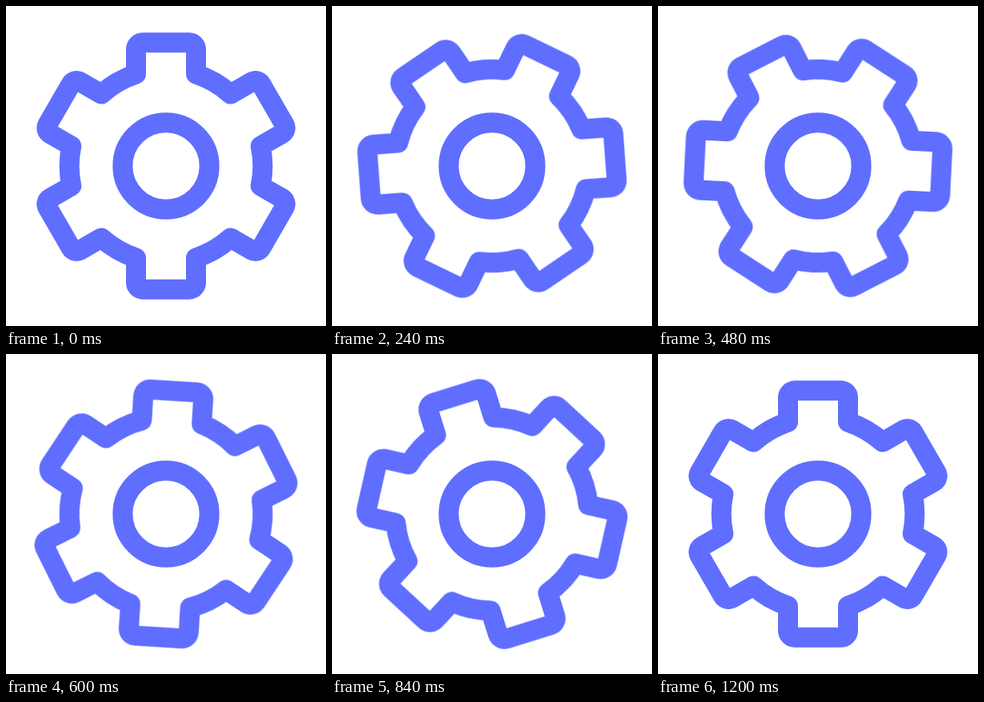
Write an HTML page that moves like this. It is 400x400 px and loops after 1230 ms.

```html
<!DOCTYPE html>
<html lang="en">
<head>
<meta charset="utf-8">
<title>Spinning gear</title>
<style>
  html, body { margin: 0; width: 100%; height: 100%; overflow: hidden; background: #fff; }
  svg { display: block; width: 100vw; height: 100vh; }
  svg * { fill: none; stroke: #5f6eff; stroke-width: 25; stroke-linejoin: round; }
  #gear { transform-origin: 0 0; }
</style>
</head>
<body>
<svg viewBox="-200 -200 400 400">
  <path id="gear"/>
  <circle r="54.17"/>
</svg>
<script>
  const TEETH = 6, RING = 120.83, TIP = 154.17, HALF = 37.5, CORNER = 8.33;
  const LOOP = 1230, SPIN = 1200;

  const base = Math.sqrt(RING * RING - HALF * HALF);
  const shoulder = TIP - CORNER, flat = HALF - CORNER;

  // One tooth pointing up: [command, x, y]
  const corner = `A${CORNER} ${CORNER} 0 0 1 `;
  const tooth = [
    [`A${RING} ${RING} 0 0 1 `, -HALF, -base],
    ['L', -HALF, -shoulder],
    [corner, -flat, -TIP],
    ['L', flat, -TIP],
    [corner, HALF, -shoulder],
    ['L', HALF, -base]
  ];

  function gearPath() {
    let d = '';
    for (let i = 0; i <= TEETH; i++) {
      const a = i * 2 * Math.PI / TEETH, c = Math.cos(a), s = Math.sin(a);
      const steps = i < TEETH ? tooth : tooth.slice(0, 1);
      for (const [cmd, x, y] of steps) {
        const px = (x * c - y * s).toFixed(3), py = (x * s + y * c).toFixed(3);
        d += (d ? cmd : 'M') + px + ' ' + py;
      }
    }
    return d + 'Z';
  }

  const gear = document.getElementById('gear');
  gear.setAttribute('d', gearPath());

  gear.animate([
    { offset: 0, transform: 'rotate(0deg)', easing: 'cubic-bezier(.333, 0, .38, 1)' },
    { offset: SPIN / LOOP, transform: 'rotate(180deg)' },
    { offset: 1, transform: 'rotate(180deg)' }
  ], { duration: LOOP, iterations: Infinity });
</script>
</body>
</html>
```
